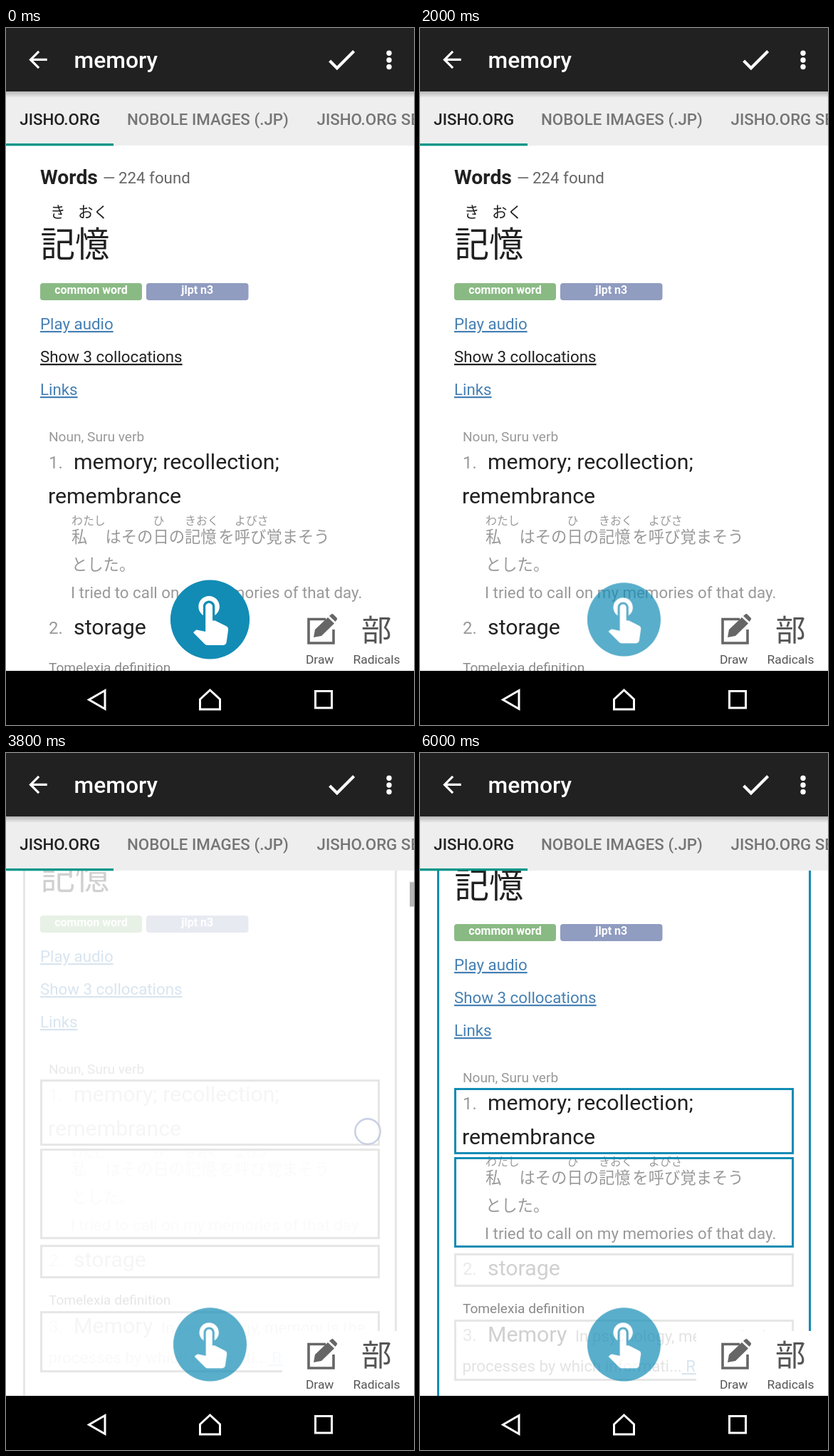
Animation, 573 px wide and 978 px high, one loop 6.2 s. Source, as an HTML page:

```html
<!DOCTYPE html>
<html lang="ja">
<head>
<meta charset="utf-8">
<title>Dictionary lookup</title>
<style>
html, body { margin: 0; width: 100%; height: 100%; overflow: hidden; background: #fff; }
svg { display: block; width: 573px; height: 978px; }
text { font: 22.3px Roboto, sans-serif; fill: #212121; white-space: pre; }
.ja { font-family: "Noto Sans CJK JP", "Noto Sans CJK", sans-serif; }
.tab { font-weight: 500; fill: #757575; }
.def { font-size: 30.3px; }
.num { font-size: 24px; }
.label { font-size: 19.1px; }
.num, .label, .ex text { fill: #999; }
.ex .ruby { font-size: 15.9px; }
.tag { font-size: 16px; font-weight: 700; fill: #fff; text-anchor: middle; }
.tool { font-size: 17.4px; fill: #555; text-anchor: middle; }
.link { fill: #4680b4; text-decoration: underline; text-decoration-thickness: 1.5px; }
.line { fill: none; stroke: #fff; stroke-width: 3; }
.box { fill: none; stroke-width: 3; }

/* every motion shares one 6200 ms clock */
.scroll, .bar, .dim, .spin, .disc, .touch, .entry, .item, .grey, .on, .recolor {
  animation: 6200ms linear infinite paused;
}
.scroll { animation-name: scroll; }
.bar { animation-name: bar; }
.dim { animation-name: dim; animation-timing-function: step-end; }
.spin { animation-name: spin; }
.disc { animation-name: disc; transform-origin: 286.5px 830px; }
.touch { animation-name: touch; }
.entry, .item.first { animation-name: choose; }
.item { animation-name: ghost; }
.item.second { animation-name: chooseLate; }
.grey { animation-name: grey; stroke: #e6e6e6; }
.on { animation-name: on; stroke: #128cb5; }
.on.late { animation-name: onLate; }
.recolor { animation-name: recolor; animation-timing-function: step-end; }

@keyframes scroll {
  0%, 43.548% { transform: translateY(0); }
  46.774% { transform: translateY(-11px); }
  50% { transform: translateY(-34px); }
  56.451% { transform: translateY(-94px); }
  61.290% { transform: translateY(-130px); }
  66.129%, 100% { transform: translateY(-118px); }
}
@keyframes bar {
  0%, 41.935% { opacity: 0; transform: translateY(0); }
  45.161% { opacity: 1; transform: translateY(0); }
  50% { transform: translateY(1.4px); }
  61.290% { transform: translateY(5.4px); }
  70.967% { opacity: 1; transform: translateY(4.9px); }
  75.806%, 100% { opacity: 0; transform: translateY(4.9px); }
}
@keyframes dim {
  0% { opacity: 0; }
  27.419% { opacity: 1; }
  32.258%, 100% { opacity: 0; }
}
@keyframes spin {
  0%, 27.419% { stroke-dasharray: 13 360; transform: rotate(-93.5deg); }
  29.032% { stroke-dasharray: 42 360; transform: rotate(-75deg); }
  30.645% { stroke-dasharray: 100 360; transform: rotate(-55deg); }
  32.258%, 100% { stroke-dasharray: 160 360; transform: rotate(-35deg); }
}
@keyframes disc {
  0% { opacity: 1; transform: none; animation-timing-function: step-end; }
  24.193% { opacity: .6; transform: none; animation-timing-function: step-end; }
  27.419% { opacity: .21; transform: scale(1); }
  32.258%, 100% { opacity: .7; transform: scale(.927); }
}
@keyframes touch {
  0%, 16.129% { opacity: 0; transform: translate(289px, 838px); }
  19.354%, 27.5% { opacity: 1; transform: translate(289px, 838px); }
  30.645% { opacity: 0; transform: translate(289px, 838px); animation-timing-function: step-end; }
  40.322% { opacity: 0; transform: translate(481px, 659px); }
  43.548% { opacity: 1; transform: translate(481px, 659px); }
  46.774% { transform: translate(485px, 648px); }
  50% { transform: translate(491px, 625px); }
  56.451% { transform: translate(502px, 566px); }
  61.290% { transform: translate(508px, 531px); }
  66.129% { opacity: 1; transform: translate(508px, 543px); }
  72.580%, 100% { opacity: 0; transform: translate(508px, 543px); }
}
@keyframes choose {
  0%, 40.322% { opacity: 1; }
  45.161%, 67.741% { opacity: .21; }
  74.193%, 100% { opacity: 1; }
}
@keyframes ghost {
  0%, 40.322% { opacity: 1; }
  45.161%, 100% { opacity: .21; }
}
@keyframes chooseLate {
  0%, 40.322% { opacity: 1; }
  45.161%, 90.322% { opacity: .21; }
  96.774%, 100% { opacity: 1; }
}
@keyframes grey {
  0%, 40.322% { opacity: 0; }
  45.161%, 100% { opacity: 1; }
}
@keyframes on {
  0%, 67.741% { opacity: 0; }
  74.193%, 100% { opacity: 1; }
}
@keyframes onLate {
  0%, 90.322% { opacity: 0; }
  96.774%, 100% { opacity: 1; }
}
@keyframes recolor {
  0% { fill: #212121; }
  41.935%, 100% { fill: #4680b4; }
}
</style>
</head>
<body>
<svg viewBox="0 0 573 978">
  <defs>
    <clipPath id="page"><rect y="165" width="573" height="737"/></clipPath>
    <linearGradient id="shade" x2="0" y2="1">
      <stop stop-opacity=".24"/><stop offset="1" stop-opacity="0"/>
    </linearGradient>
    <rect id="outer" x="25.5" y="244.5" width="522" height="900"/>
    <rect id="first" x="49.5" y="589.5" width="474" height="90"/>
    <rect id="second" x="49.5" y="686.5" width="474" height="124"/>
    <rect id="third" x="49.5" y="821.5" width="474" height="44"/>
    <rect id="fourth" x="49.5" y="914.5" width="474" height="83"/>
  </defs>

  <rect width="573" height="978" fill="#fff"/>

  <g clip-path="url(#page)">
    <g class="scroll">
      <text x="48" y="219" style="font-size:28.3px;font-weight:700">Words</text>
      <g style="--c:#777">
        <text x="136" y="218" style="fill:#666">—</text>
        <text x="158" y="218" style="fill:#666">224 found</text>
      </g>

      <g class="entry">
        <text class="ja" x="62" y="266" style="font-size:21.5px">き</text>
        <text class="ja" x="101" y="266" style="font-size:21.5px">おく</text>
        <text class="ja" x="48.5" y="321" style="font-size:48.5px">記憶</text>

        <rect x="48" y="358" width="143" height="24" rx="4" fill="#8aba84"/>
        <text class="tag" x="119.5" y="373">common word</text>
        <rect x="197" y="358" width="143.5" height="24" rx="4" fill="#909cc0"/>
        <text class="tag" x="268.7" y="373">jlpt n3</text>

        <text class="link" x="48" y="423">Play audio</text>
        <text class="link recolor" x="48" y="469">Show 3 collocations</text>
        <text class="link" x="48" y="515">Links</text>

        <text class="label" x="60" y="579.5">Noun, Suru verb</text>
        <g class="item first">
          <text class="num" x="60" y="618">1.</text>
          <text class="def" x="95" y="619">memory; recollection;</text>
          <text class="def" x="59" y="667">remembrance</text>
        </g>

        <g class="item second ex">
          <text class="ja ruby" x="92" y="697">わたし</text>
          <text class="ja ruby" x="206.5" y="697">ひ</text>
          <text class="ja ruby" x="251" y="697">きおく</text>
          <text class="ja ruby" x="321" y="697">よびさ</text>
          <text class="ja" x="92" y="722">私</text>
          <text class="ja" x="139.5" y="722">はその日の記憶</text>
          <text class="ja" x="298.5" y="722">を呼び覚まそう</text>
          <text class="ja" x="92" y="761">とした。</text>
          <text x="91" y="800">I tried to call on my memories of that day.</text>
        </g>

        <g class="item">
          <text class="num" x="60" y="850">2.</text>
          <text class="def" x="95" y="851">storage</text>
        </g>

        <text class="label" x="60" y="903.5" style="fill:#888">Tomelexia definition</text>
        <g class="item">
          <text class="num" x="60" y="943">3.</text>
          <text class="def" x="95" y="944">Memory</text>
          <text x="218" y="944" style="fill:#777">In psychology, memory is the</text>
          <text x="59.5" y="986" style="fill:#777">processes by which informati...<tspan class="link"> Read more</tspan></text>
        </g>
      </g>

      <g class="box grey">
        <use href="#outer"/><use href="#first"/><use href="#second"/>
        <use href="#third"/><use href="#fourth"/>
      </g>
      <g class="box on"><use href="#outer"/><use href="#first"/></g>
      <g class="box on late"><use href="#second"/></g>
    </g>

    <rect class="bar" x="567" y="175.6" width="6" height="34.5" fill="#b4b4b4"/>

    <rect x="388" y="811" width="185" height="91" fill="#fff"/>
    <path d="M449 829.5H425V863H460V844" fill="none" stroke="#666" stroke-width="3.6"/>
    <path d="M432 855L434 844 452 827 461 835.500 443 853ZM454 825L457 822.500Q458.500 821.500 460 823L464.500 827.500Q466 829 464.500 830.500L462.500 833Z" fill="#666"/>
    <text class="tool" x="440.700" y="892">Draw</text>
    <text class="ja" x="499" y="860" style="font-size:42.500px;font-weight:300;fill:#555">部</text>
    <text class="tool" x="520.500" y="892">Radicals</text>

    <g class="disc">
      <circle cx="286.5" cy="830" r="55.6" fill="#128cb5"/>
      <path transform="translate(247.4 787.2) scale(3.28)" fill="#fff" d="M9 11.24V7.5C9 6.12 10.12 5 11.5 5S14 6.12 14 7.5v3.74c1.21-.81 2-2.18 2-3.74C16 5.01 13.99 3 11.5 3S7 5.01 7 7.5c0 1.56.79 2.93 2 3.74zm9.84 4.63l-4.54-2.26c-.17-.07-.35-.11-.54-.11H13v-6c0-.83-.67-1.5-1.5-1.5S10 6.67 10 7.5v10.740l-3.43-.72c-.4-.06-.75.02-1.03.3l-.79.8 4.940 4.940c.27.27.65.44 1.060.44h6.79c.75 0 1.33-.55 1.44-1.28l.75-5.27c.08-.7-.32-1.35-.89-1.58z"/>
    </g>

    <g class="dim">
      <rect y="165" width="573" height="737" fill-opacity=".15"/>
      <g transform="translate(286.5 533.5)">
        <circle class="spin" r="48" pathLength="360" fill="none" stroke="#009688" stroke-width="10.5"/>
      </g>
    </g>

    <circle class="touch" r="17.7" fill="#fff" fill-opacity=".6" stroke="#bcc6de" stroke-opacity=".85" stroke-width="2.4"/>
  </g>

  <rect y="89" width="573" height="76" fill="#eee"/>
  <rect y="89" width="573" height="9" fill="url(#shade)"/>
  <rect y="162" width="151" height="3.3" fill="#009688"/>
  <text class="tab" x="19.3" y="136" style="fill:#212121">JISHO.ORG</text>
  <text class="tab" x="170" y="136">NOBOLE IMAGES (.JP)</text>
  <text class="tab" x="436.500" y="136">JISHO.ORG SENTENCES</text>

  <rect width="573" height="89" fill="#212121"/>
  <path transform="translate(25.900 25.300) scale(1.592)" fill="#fff" d="M20 11H7.83l5.590-5.590L12 4l-8 8 8 8 1.410-1.410L7.830 13H20z"/>
  <text x="95.500" y="56" style="font-size:31.8px;font-weight:500;fill:#fff">memory</text>
  <path transform="translate(446 19.300) scale(2.1)" fill="#fff" d="M9 16.170L4.830 12l-1.420 1.410L9 19 21 7l-1.410-1.410z"/>
  <g fill="#fff">
    <circle cx="538" cy="35.300" r="3.700"/><circle cx="538" cy="45" r="3.700"/><circle cx="538" cy="54.500" r="3.700"/>
  </g>

  <rect y="902" width="573" height="76"/>
  <path class="line" d="M116.500 942.500L139 929.500V955.500ZM272.500 942L286.500 929 300.500 942V956H272.500ZM434.500 930.500H457.500V954H434.500Z"/>
</svg>
<script>
const LOOP = 6200, STEP = 100;
const motions = document.getAnimations();
const start = performance.now();

// The picture advances in whole steps of 100 ms.
function draw() {
  const t = (performance.now() - start) % LOOP;
  const held = Math.floor(t / STEP) * STEP + 2;
  for (const m of motions) m.currentTime = held;
  requestAnimationFrame(draw);
}
draw();
</script>
</body>
</html>
```
